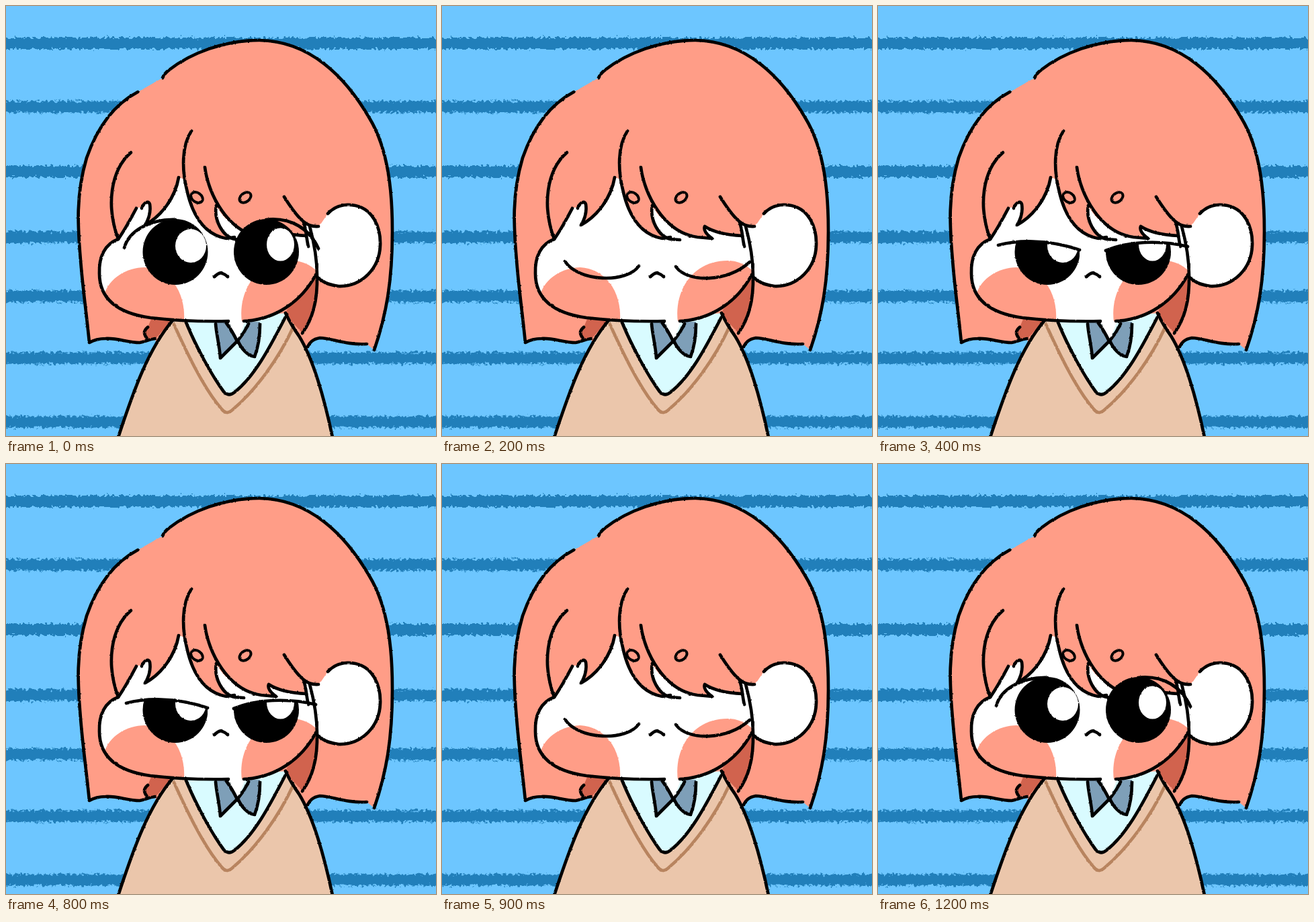
These frames come from a looping animation (640x640 px, 1600 ms). An HTML page:

```html
<!DOCTYPE html>
<html lang="en">
<head>
<meta charset="utf-8">
<title>Blinking girl</title>
<style>
  html, body { margin: 0; width: 100%; height: 100%; overflow: hidden; background: #6dc6ff; }
  svg { display: block; width: 100vw; height: 100vh; }

  .stripes { stroke: #217fba; stroke-width: 17; }
  .hair { fill: #ff9d87; }
  .shade { fill: #d1634e; }
  .skin { fill: #fff; }
  .knit { fill: #ebc6ab; }
  .shirt { fill: #d9fbff; }
  .bow { fill: #7e9fb8; }
  .line, .trim { fill: none; stroke: #000; stroke-width: 4.7; stroke-linecap: round; stroke-linejoin: round; }
  .trim { stroke: #b8845f; }
  .brow { fill: #ff9d87; stroke-width: 4; }

  .open, .half, .closed { animation: 1600ms step-end infinite; }
  .open { animation-name: open; }
  .half { animation-name: half; }
  .closed { animation-name: closed; }
  @keyframes open {
    0%, 31.25%, 75%, 100% { opacity: 1; }
    6.25%, 50% { opacity: 0; }
  }
  @keyframes half {
    0%, 12.5%, 31.25%, 56.25%, 75%, 100% { opacity: 0; }
    6.25%, 25%, 50%, 68.75% { opacity: 1; }
  }
  @keyframes closed {
    0%, 25%, 68.75%, 100% { opacity: 0; }
    12.5%, 56.25% { opacity: 1; }
  }
</style>
</head>
<body>
<svg viewBox="0 0 640 640" xmlns="http://www.w3.org/2000/svg">
  <defs>
    <!-- Ragged brush edges -->
    <filter id="brush" filterUnits="userSpaceOnUse" x="-20" y="0" width="680" height="640" color-interpolation-filters="sRGB">
      <feTurbulence type="fractalNoise" baseFrequency=".24" numOctaves="2" seed="4"/>
      <feDisplacementMap in="SourceGraphic" scale="11" xChannelSelector="R" yChannelSelector="G"/>
    </filter>
    <filter id="pencil" filterUnits="userSpaceOnUse" x="0" y="0" width="640" height="660" color-interpolation-filters="sRGB">
      <feTurbulence type="fractalNoise" baseFrequency=".3" numOctaves="1" seed="9"/>
      <feDisplacementMap in="SourceGraphic" scale="2.4" xChannelSelector="R" yChannelSelector="G"/>
    </filter>

    <path id="face" d="M167 347 C175 336 185 318 196 300 L202 300 C206 291 212 290 214 295
      C216 308 212 318 207 326 C232 312 252 285 257 255 L266 258 C271 290 284 335 320 345
      L338 347 C318 337 308 316 313 297 C325 320 347 339 402 346 C393 340 389 333 391 328
      C405 337 425 341 447 342 L443 321 Q452 329 466 328 L462 400
      C440 440 400 469 353 469 L331 469 C285 470 250 468 215 464 C165 457 139 435 139 398
      C138 372 148 354 167 347Z"/>
    <clipPath id="inFace"><use href="#face"/></clipPath>
    <clipPath id="belowLids">
      <path d="M179 356 C205 349 250 346 300 363 V430 H179Z M339 364 C372 350 420 348 461 358 V430 H339Z"/>
    </clipPath>

    <g id="pupils">
      <ellipse cx="252" cy="366" rx="48.5" ry="49"/>
      <ellipse cx="387.5" cy="366" rx="48.5" ry="49"/>
      <ellipse class="skin" cx="275" cy="357" rx="23" ry="25"/>
      <ellipse class="skin" cx="408.5" cy="355" rx="20.5" ry="24.5"/>
    </g>
  </defs>

  <rect width="640" height="640" fill="#6dc6ff"/>
  <path class="stripes" filter="url(#brush)" d="M-20 55.5H660 M-20 150H660 M-20 246.5H660 M-20 344H660 M-20 432H660 M-20 524H660 M-20 619H660"/>

  <g filter="url(#pencil)">
    <!-- Hair mass -->
    <path class="hair" d="M196 128 L233 107 Q236 100 243 95 C275 70 325 51 377 51 C452 52 505 105 541 167
      C570 215 575 280 575 335 C575 410 566 460 548 512 L537 503 C505 505 485 494 467 494
      C456 496 452 502 449 510 H225 L222 495 C212 497 207 500 199 501 C180 501 168 494 148 495
      C138 495 131 497 124 501 C120 460 115 425 112 390 C106 325 104 280 120 226 C135 183 160 147 196 128Z"/>
    <path class="shade" d="M216 466 L248 466 L222 496 L209 497 C204 488 206 484 211 478Z"/>
    <path class="shade" d="M461 400 C466 435 457 466 441 487 L414 457Z"/>
    <path class="line" d="M233 107 Q236 100 243 95 C275 70 325 51 377 51 C452 52 505 105 541 167 C570 215 575 280 575 335 C575 410 566 460 548 512"/>
    <path class="line" d="M196 128 C160 147 135 183 120 226 C104 280 106 325 112 390 C115 425 120 460 124 501
      C131 497 138 495 148 495 C168 494 180 501 199 501 C207 500 212 496 222 495"/>
    <path class="line" d="M211 478 C204 484 205 488 210 495 M449 507 C452 501 456 496 467 494 C485 494 505 505 537 503"/>
    <path class="line" d="M463 400 C464 440 456 466 441 487"/>

    <!-- Clothes -->
    <path class="knit" d="M248 466 C212 510 190 572 167 642 H486 C474 585 457 525 436 491 C428 480 422 470 416 457 L331 560 L272 466Z"/>
    <path class="shirt" d="M268 466 C283 507 305 548 324 574 Q331 582 340 575 C372 550 396 501 418 457 L353 462Z"/>
    <path class="trim" d="M250 474 C271 520 295 570 321 600 Q328 609 336 602 C371 573 406 525 428 477"/>
    <path class="line" d="M248 468 C212 510 190 572 167 642 M416 457 C422 470 428 480 436 491 C457 525 474 585 486 642"/>
    <path class="line" d="M268 471 C283 507 305 548 324 574 Q331 582 340 575 C372 550 396 501 418 459"/>
    <path class="skin" d="M329 467 L345 497 L357 467Z"/>
    <g class="bow">
      <path d="M312 470 L319 524 L344 499 L328 470Z"/>
      <path d="M362 470 L345 498 C350 510 360 521 370 522 C375 509 378 490 378 470Z"/>
    </g>
    <path class="line" d="M312 473 C313 488 318 507 319 524 L344 499 Q337 484 328 472 M361 473 Q355 486 345 498 C350 510 360 521 370 522 C375 509 378 490 378 473"/>

    <!-- Face and ear -->
    <path class="skin" d="M479 309 C490 297 505 294 520 297 C545 302 558 328 557 356 C556 390 530 418 495 417
      C480 415 470 411 461 401 L455 333 L466 328Z"/>
    <use href="#face" class="skin"/>
    <g class="hair" clip-path="url(#inFace)">
      <path d="M146 430 C153 405 180 389 206 389 C240 391 268 421 265 470 H146Z"/>
      <path d="M351 470 C345 424 373 379 425 379 C440 379 453 385 463 395 V470Z"/>
    </g>
    <g class="line">
      <path d="M167 347 C148 354 138 372 139 398 C139 435 165 457 215 464 C250 468 285 470 331 469"/>
      <path d="M354 469 C400 467 440 440 461 400"/>
      <path d="M479 309 C490 297 505 294 520 297 C545 302 558 328 557 356 C556 390 530 418 495 417 C480 415 470 411 461 401"/>
      <path d="M452 328 C458 350 463 375 463 402"/>
    </g>

    <!-- Fringe strands -->
    <g class="line">
      <path d="M186 218 C155 245 149 298 167 347 C175 336 185 318 194 301"/>
      <path d="M202 301 C206 291 212 290 214 295 C216 308 212 318 207 326 C232 312 252 285 257 255"/>
      <path d="M276 186 C261 208 262 245 269 273 C277 310 294 340 328 346 L340 344"/>
      <path d="M313 297 C309 318 322 343 340 347 L354 348"/>
      <path d="M296 240 C301 280 330 337 380 344 L402 346 C393 340 389 333 391 328 C405 337 425 341 447 342"/>
      <path d="M414 284 C424 300 434 314 443 321 Q452 329 465 328 M443 322 C447 333 447 346 450 358"/>
    </g>
    <g class="line brow">
      <ellipse cx="284" cy="285" rx="9.5" ry="7" transform="rotate(35 284 285)"/>
      <ellipse cx="356" cy="285" rx="9.5" ry="6.5" transform="rotate(-38 356 285)"/>
    </g>
    <path class="line" d="M310 403 Q315 398 320 397 Q326 399 330 403"/>

    <!-- Eyes -->
    <g class="open">
      <path class="line" d="M176 360 C183 334 215 317 252 318 M387 318 C425 314 452 332 465 361"/>
      <use href="#pupils"/>
    </g>
    <g class="half">
      <use href="#pupils" clip-path="url(#belowLids)"/>
      <path class="line" d="M179 356 C205 349 250 346 300 363 M339 364 C372 350 420 348 461 358"/>
    </g>
    <path class="line closed" d="M183 380 C203 411 275 413 293 387 M348 388 C365 412 425 412 458 381"/>
  </g>
</svg>
</body>
</html>
```
